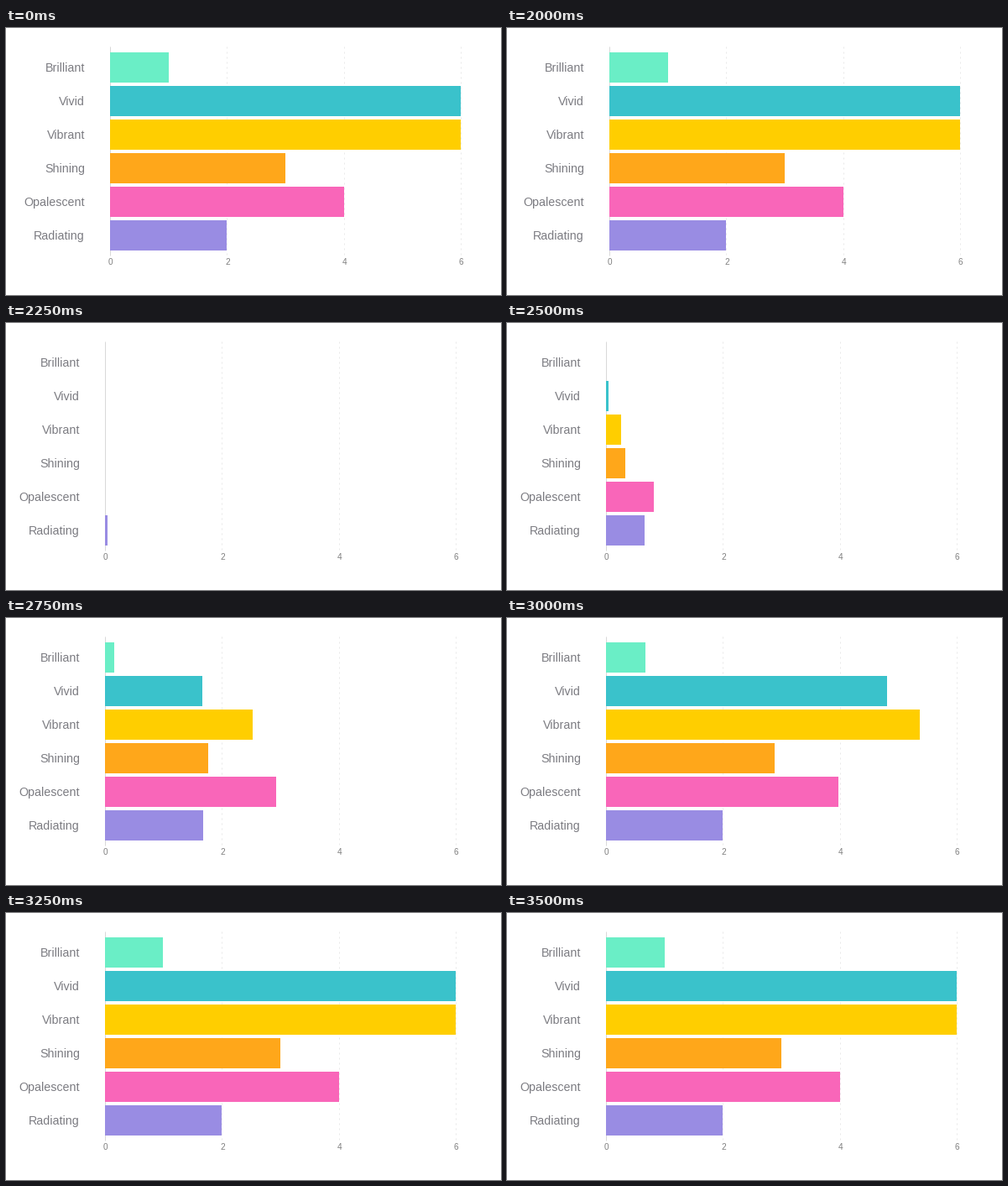
These frames come from a looping animation (590x318 px, 3750 ms). A matplotlib script:

```python
import matplotlib.pyplot as plt
from matplotlib.animation import FuncAnimation
from matplotlib.patches import Rectangle

W, H, DPI = 590, 318, 100
STEP, LOOP = 250, 3750
UNIT = 418 / 6
GROW, STAGGER, START = 800, 69.5, 2174

BARS = [
    ("Brilliant", 1, "#6aeec6"),
    ("Vivid", 6, "#3ac2cb"),
    ("Vibrant", 6, "#ffce00"),
    ("Shining", 3, "#ffa71a"),
    ("Opalescent", 4, "#f966b9"),
    ("Radiating", 2, "#998ce3"),
]


def px(size):
    return size * 72 / DPI


def ease(u):
    """Quadratic ease in and out, clamped to 0..1."""
    u = min(max(u, 0), 1)
    return 2 * u * u if u < 0.5 else 1 - 2 * (1 - u) ** 2


def origin(t):
    """The chart slides left as the labels resize, then stays."""
    return 124 if t < 2000 else 122 if t < 2250 else 118


def progress(row, t):
    if t < 2250:
        return 1
    delay = (len(BARS) - 1 - row) * STAGGER
    return ease((t - START - delay) / GROW)


plt.rcParams["font.family"] = "Liberation Sans"
fig = plt.figure(figsize=(W / DPI, H / DPI), dpi=DPI, facecolor="white")
ax = fig.add_axes([0, 0, 1, 1])
ax.set_xlim(0, W)
ax.set_ylim(H, 0)
ax.axis("off")

grid, ticks = [], []
for value in (0, 2, 4, 6):
    style = "-" if value == 0 else (0, (2, 4))
    grid += ax.plot([0, 0], [22, 271], color="#d8d8d8" if value == 0 else "#e9e9e9",
                    lw=px(1), ls=style, dash_capstyle="butt",
                    solid_capstyle="butt", zorder=1)
    ticks.append(ax.text(0, 282, str(value), size=px(10), color="#808080",
                         ha="center", va="baseline"))

rects, labels = [], []
for row, (name, value, color) in enumerate(BARS):
    top = 29 + 40 * row
    rects.append(ax.add_patch(Rectangle((0, top), 0, 36, fc=color, lw=0, zorder=2)))
    labels.append(ax.text(0, top + 23, name, size=px(14.2), color="#7c7c82",
                          ha="right", va="baseline"))


def draw(i):
    t = i * STEP
    x0 = origin(t)
    for k, (line, tick) in enumerate(zip(grid, ticks)):
        x = x0 + 2 * k * UNIT
        line.set_xdata([x, x])
        tick.set_x(x + 0.5)
    for row, (rect, label) in enumerate(zip(rects, labels)):
        rect.set_x(x0)
        rect.set_width(BARS[row][1] * UNIT * progress(row, t))
        label.set_x(x0 - 30)
    return grid + ticks + rects + labels


anim = FuncAnimation(fig, draw, frames=LOOP // STEP, interval=STEP,
                     repeat=True, repeat_delay=0, blit=False)
plt.show()
```
